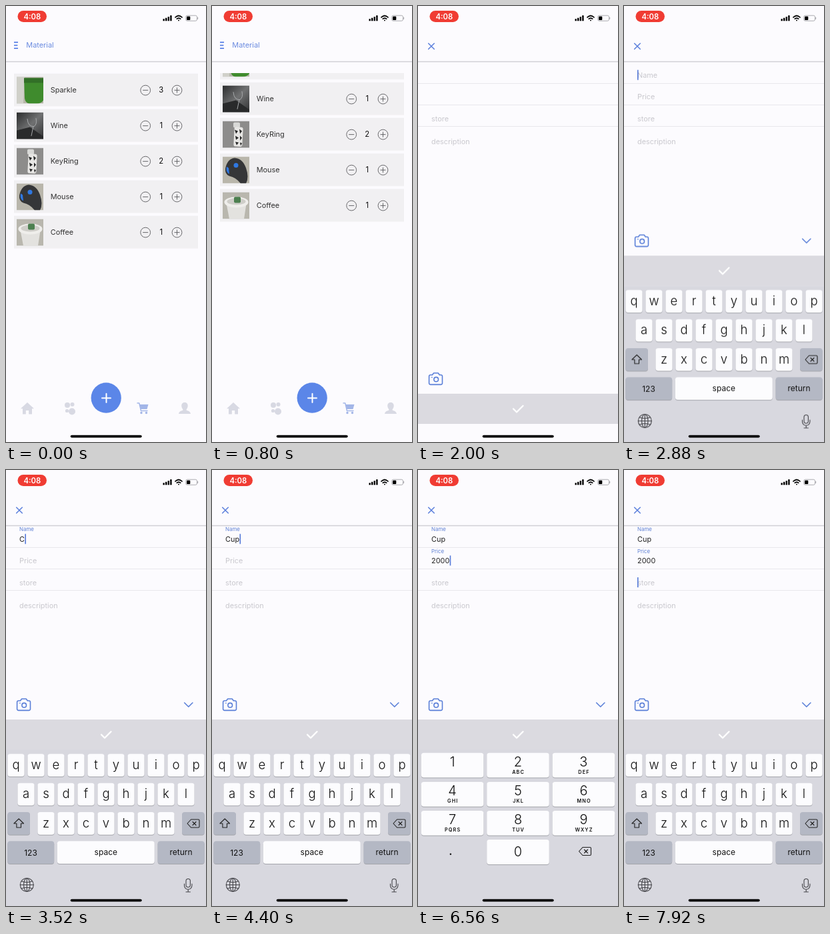
Animation, 300 px wide and 650 px high, one loop 8 s. Source, as an HTML page:

```html
<!DOCTYPE html>
<html lang="en">
<head>
<meta charset="utf-8">
<title>Material list</title>
<style>
  html, body { margin: 0; width: 100%; height: 100%; overflow: hidden; background: #fcfbfe; }
  svg { display: block; width: 100%; height: 100%; }
  text { font-family: Inter, Roboto, sans-serif; }
  .line { fill: none; stroke-linecap: round; stroke-linejoin: round; }
</style>
</head>
<body>
<svg id="stage" viewBox="0 0 300 650">
  <defs>
    <clipPath id="listClip"><rect x="0" y="100.5" width="300" height="440"/></clipPath>
    <clipPath id="thumbClip"><rect width="40" height="40"/></clipPath>
    <linearGradient id="dark" x2="1" y2="1">
      <stop stop-color="#2b2c2d"/><stop offset=".5" stop-color="#707172"/><stop offset="1" stop-color="#303132"/>
    </linearGradient>
  </defs>
  <rect width="300" height="650" fill="#fcfbfe"/>

  <g id="home">
    <path d="M12 54.2h6M12 58.7h5.4M12 63.2h6" stroke="#5b82e6" stroke-width="1.8"/>
    <rect y="82" width="300" height="2" fill="#dcdbe0"/>
    <g clip-path="url(#listClip)"><g id="list"></g></g>
    <g fill="#d8d9e3">
      <path d="M32 591l10 9.2h-3v8.300h-4.800v-5.500h-4.400v5.500h-4.800v-8.300h-3z"/>
      <circle cx="92" cy="595" r="4"/><circle cx="99.500" cy="594" r="3"/>
      <circle cx="99" cy="604.500" r="5"/><circle cx="91.500" cy="603.500" r="2.600"/>
      <path d="M268 591c3.400 0 5 2.600 4.700 5.600-.2 2-1 3.500-2 4.600v1.600c2.800 1 5.600 1.500 6.300 5.200h-18c.7-3.700 3.500-4.200 6.300-5.200v-1.600c-1-1.100-1.800-2.600-2-4.600-.3-3 1.300-5.600 4.700-5.600z"/>
    </g>
    <g fill="#a3b6e8">
      <path d="M200.500 594h13l-2 7h-9.500z"/>
      <circle cx="203" cy="606.500" r="1.700"/><circle cx="210.500" cy="606.500" r="1.700"/>
      <path class="line" style="fill:none" d="M197 592h2.800l2.700 11.500h9.500" stroke="#a3b6e8" stroke-width="1.500"/>
    </g>
    <circle cx="150.200" cy="584.200" r="22.600" fill="#5b86e8"/>
    <path class="line" d="M144 584.500h13M150.500 578v13" stroke="#fff" stroke-width="2"/>
  </g>

  <g id="form">
    <rect width="300" height="650" fill="#fcfbfe"/>
    <path class="line" d="M15.700 55.700l8.600 8.600M24.300 55.700l-8.600 8.600" stroke="#5b7fdc" stroke-width="1.500"/>
    <rect y="82" width="300" height="2" fill="#dcdbe0"/>
    <path d="M0 115.500h300M0 147.500h300M0 179.500h300" stroke="#e9e8ec"/>
    <g id="fields"></g>
    <g id="footer">
      <rect y="578" width="300" height="45" fill="#dbdae0"/>
      <path class="line" d="M143 600.500l5 5 9.500-9.500" stroke="#fff" stroke-width="2.300"/>
      <g class="line" stroke="#5a7fd8" stroke-width="1.600">
        <path d="M18.800 550h2.700l2-2.700h6.800l2 2.700h2a2.200 2.200 0 0 1 2.200 2.200v10a2.200 2.200 0 0 1-2.200 2.200h-15.500a2.200 2.200 0 0 1-2.200-2.200v-10a2.200 2.200 0 0 1 2.200-2.200z"/>
        <circle cx="27.200" cy="556.700" r="3.300"/>
        <path d="M20.700 553.500h.3"/>
        <path id="chevron" d="M267.700 553l6.100 6 6.100-6"/>
      </g>
    </g>
    <g id="keyboard">
      <rect y="417" width="300" height="233" fill="#d8d8df"/>
      <g id="letters"></g>
      <g id="digits"></g>
    </g>
  </g>

  <rect x="17.500" y="7" width="43.500" height="17" rx="8.500" fill="#f03c33"/>
  <text x="39.300" y="19.600" font-size="11.300" font-weight="600" fill="#fff" text-anchor="middle">4:08</text>
  <path d="M235.500 19.200h2.400v3h-2.400zM239 17.700h2.400v4.500h-2.400zM242.600 16h2.400v6.200h-2.400zM246.200 14h2.400v8.200h-2.400z"/>
  <g class="line" stroke="#000" stroke-width="1.700">
    <path d="M254 16.800q5-4.600 10 0M256.300 19.200q2.700-2.300 5.400 0"/><path d="M258.900 21.400h.2"/>
  </g>
  <rect x="269.700" y="14.200" width="16.800" height="8" rx="2.200" fill="none" stroke="#a3a3a8" stroke-width=".9"/>
  <rect x="271" y="15.500" width="5.300" height="5.400" rx="1"/>
  <path d="M287.700 16.700v3" stroke="#a3a3a8"/>
  <rect x="96.700" y="639.700" width="107" height="3.800" rx="1.900"/>
</svg>

<script>
const LOOP = 8000;
const $ = id => document.getElementById(id);

function add(parent, markup) {
  const g = document.createElementNS('http://www.w3.org/2000/svg', 'g');
  g.innerHTML = markup;
  parent.append(g);
  return g;
}

const text = (x, y, s, size = 10.9, fill = '#333', more = '') =>
  `<text x="${x}" y="${y}" font-size="${size}" fill="${fill}" ${more}>${s}</text>`;
const mid = (x, y, s, size, weight = 400) =>
  text(x, y, s, size, '#111', `text-anchor="middle" font-weight="${weight}"`);

// steps: [ms, value, easing to the next step]
function track(el, prop, steps) {
  el.animate(steps.map(([t, v, easing = 'linear']) => ({ offset: t / LOOP, [prop]: v, easing })),
    { duration: LOOP, iterations: Infinity });
}

// Visible only within the given [from, to] spans, with hard changes
function show(el, ...spans) {
  const steps = [[0, 0, 'step-end']];
  for (const [a, b] of spans) steps.push([a, 1, 'step-end'], [b, b === LOOP ? 1 : 0, 'step-end']);
  if (steps[steps.length - 1][0] < LOOP) steps.push([LOOP, 0]);
  track(el, 'opacity', steps);
}

const up = y => `translateY(${y}px)`;

// Item list
const items = [
  ['Sparkle', 3, `<rect width="40" height="40" fill="#b5b5a8"/><path d="M0 0h12l-2 40H0z" fill="#d0d0c9"/>
    <path d="M11 2h29v33q-3 5-10 5H19q-6-1-7-8z" fill="#3f8b2d"/><path d="M11 2h29v7H11z" fill="#326f27"/>`],
  ['Wine', 1, `<rect width="40" height="40" fill="url(#dark)"/><path d="M0 27l20-5 20 14v4H0z" fill="#292a2b"/>
    <path class="line" d="M16 10q1 12 10 11 5-3 3-12M25 21l-3 14" stroke="#a7a9ab"/>`],
  ['KeyRing', 2, `<rect width="40" height="40" fill="#8d8c8b"/><rect x="16" y="2" width="10" height="8" rx="2" fill="#d8d8d6"/>
    <rect x="17" y="9" width="13" height="29" rx="3" fill="#e7e6e4" transform="rotate(3 23 23)"/>
    <path d="M18 13l5 2-3 4zM25 12l4 3-3 4zM19 22l5 3-4 3zM26 22l3 3-3 4zM19 31l5 1-3 4zM26 32l3 1-2 4z" fill="#252525"/>`],
  ['Mouse', 1, `<rect width="40" height="40" fill="#b9b6ab"/><path d="M4 18Q7 3 18 2q12 1 17 15 5 14 0 23H27Q20 31 10 29 3 26 4 18z" fill="#353638"/>
    <path d="M6 15q-2 8 4 11l-1-9z" fill="#2f78e2"/><circle cx="20" cy="13" r="3.500" fill="#2f78e2"/>`],
  ['Coffee', 1, `<rect width="40" height="40" fill="#b9b7ae"/><path d="M5 14h31l-4 26H10z" fill="#e3e2df"/>
    <ellipse cx="20.500" cy="15" rx="18" ry="8" fill="#efeeeb"/><ellipse cx="20.500" cy="14" rx="14" ry="5" fill="#cfcec9"/>
    <rect x="17" y="7" width="10" height="9" rx="2" fill="#4d8050"/>`]
];
add($('home'), text(30.3, 62.4, 'Material', 10.9, '#6b8ce0'));
items.forEach(([name, count, photo], i) => {
  const row = add($('list'), `<rect x="12" y=".8" width="276" height="48.700" fill="#f1f0f2"/>
    <g transform="translate(16 5.500)" clip-path="url(#thumbClip)">${photo}</g>
    ${text(66.7, 29.2, name)}${mid(232.8, 28.8, count, 11.3)}
    <g fill="none" stroke="#5b5b5e" stroke-width=".9"><circle cx="209.200" cy="25.600" r="7.400"/><circle cx="256.500" cy="25.600" r="7.400"/>
    <path d="M205.200 25.600h8M252.500 25.600h8M256.500 21.600v8"/></g>`);
  row.setAttribute('transform', `translate(0 ${100 + i * 53})`);
});
track($('list'), 'transform', [
  [0, up(0)], [120, up(0), 'ease-in-out'], [720, up(-40)], [880, up(-40), 'cubic-bezier(.2,.6,.3,1)'],
  [1360, up(0)], [LOOP, up(0)]
]);

// Screen and keyboard moves
const OPEN = 1780, KEYS = 2620;
track($('form'), 'transform', [
  [0, up(650)], [OPEN, up(650), 'cubic-bezier(.2,.7,.3,1)'], [1990, up(0)], [LOOP, up(0)]
]);
const rise = (el, dist, from, to) => track(el, 'transform', [
  [0, up(from)], [KEYS, up(from), 'cubic-bezier(.2,.7,.2,1)'], [KEYS + 280, up(to)], [LOOP, up(to)]
]);
rise($('footer'), 206, 0, -206);
rise($('keyboard'), 233, 233, 0);
show($('chevron'), [KEYS, LOOP]);

// Form fields: placeholder, floating label, typed states
const PRICE = 4880, STORE = 7300;
const grey = '#c9c8ce', blue = '#5f80d4';

function field(name, y, typedAt) {
  const hint = add($('fields'), text(20, y, name, 10.9, grey));
  if (!typedAt) return;
  show(hint, [0, typedAt]);
  const label = add($('fields'), text(20, y - 15.6, name, 7.9, blue));
  track(label, 'opacity', [[0, 0], [typedAt, 0], [typedAt + 80, 1], [LOOP, 1]]);
}

// states: [ms, value]; the caret stays until blur, the last value stays on
function typing(y, states, blur) {
  states.forEach(([from, value], i) => {
    const next = states[i + 1];
    const g = add($('fields'), text(20, y, value, 10.9, '#222'));
    show(g, [from, next ? next[0] : LOOP]);
    const x = 20 + (value ? g.firstChild.getComputedTextLength() + .4 : 0);
    const caret = add($('fields'), `<rect x="${x}" y="${y - 11.7}" width="1.600" height="15" fill="#5579d8"/>`);
    const end = next ? next[0] : blur, spans = [];
    for (let t = from; t < end; t += 1000) spans.push([t, Math.min(t + 650, end)]);
    show(caret, ...spans);
  });
}

field('Name', 107, 3440);
field('Price', 139.2, 5480);
field('store', 171.7);
field('description', 206);
typing(107, [[2680, ''], [3440, 'C'], [3920, 'Cu'], [4320, 'Cup']], PRICE);
const zeros = [5760, 6000, 6240];
typing(139.2, [[PRICE, ''], [5480, '2'], ...zeros.map((t, i) => [t, '2' + '0'.repeat(i + 1)])], STORE);
typing(171.7, [[STORE, '']], LOOP);

// Keys
const key = (x, y, w, h, fill = '#fcfcfe') =>
  `<rect x="${x}" y="${y + 1}" width="${w}" height="${h}" rx="4" fill="#a4a5ab"/>
   <rect x="${x}" y="${y}" width="${w}" height="${h}" rx="4" fill="${fill}"/>`;
const erase = (x, y) => `<path class="line" stroke="#222" stroke-width="1.100"
  d="M${x - 9} ${y}l5.500-6h11a1.500 1.500 0 0 1 1.500 1.500v9a1.500 1.500 0 0 1-1.500 1.500h-11zM${x - 1} ${y - 2.5}l5 5m0-5l-5 5"/>`;
const arrow = fill => `<path class="line" style="fill:${fill}" stroke="#222" stroke-width="1.100"
  d="M19.200 520l7.300 7h-4v6h-6.600v-6h-4z"/>`;

const letters = $('letters'), dim = '#b4b8c4';
const rows = [['qwertyuiop', 15], ['asdfghjkl', 30], ['zxcvbnm', 60]];
const eachKey = draw => rows.map(([row, x], r) =>
  [...row].map((c, i) => draw(c, x + i * 30, 423.3 + r * 43.4)).join('')).join('');

add(letters, eachKey((c, x, y) => key(x - 12.6, y, 25.2, 33.6))
  + key(2.4, 510.1, 33.6, 33.6, dim) + key(264, 510.1, 33.6, 33.6, dim) + erase(281, 527)
  + key(2.4, 553.3, 69.8, 33.6, dim) + key(76.8, 553.3, 146, 33.6) + key(227.6, 553.3, 70, 33.6, dim)
  + mid(37, 574.5, '123', 12) + mid(149.8, 574, 'space', 12) + mid(262.6, 574, 'return', 12)
  + `<g class="line" stroke="#45454a" stroke-width="1.100"><circle cx="31.300" cy="618.500" r="10"/>
     <ellipse cx="31.300" cy="618.500" rx="4.700" ry="10"/><path d="M21.300 618.500h20M31.300 608.500v20M23.300 613q8 3.500 16 0M23.300 624q8-3.500 16 0"/>
     <rect x="270" y="609.500" width="6.400" height="12.500" rx="3.200"/><path d="M267.500 617v2.500a5.700 5.700 0 0 0 11.400 0V617M273.200 625.500v3.500M270 629h6.400"/></g>`);
const SHIFT = [3040, 3440];
const lower = add(letters, eachKey((c, x, y) => mid(x, y + 22.7, c, 18.6, 300)) + arrow('none'));
const upper = add(letters, key(2.4, 510.1, 33.6, 33.6) + arrow('#222')
  + eachKey((c, x, y) => mid(x, y + 23.4, c.toUpperCase(), 18, 300)));
show(lower, [0, SHIFT[0]], [SHIFT[1], LOOP]);
show(upper, SHIFT);
show(letters, [0, PRICE], [STORE, LOOP]);

const pad = $('digits');
const presses = { 2: [[5360, 5480]], 0: zeros.map(t => [t - 100, t]) };
add(pad, '<rect y="417" width="300" height="233" fill="#d8d8df"/>');
['', 'ABC', 'DEF', 'GHI', 'JKL', 'MNO', 'PQRS', 'TUV', 'WXYZ', '0'].forEach((sub, i) => {
  const zero = i === 9, n = zero ? 0 : i + 1;
  const x = 4.8 + (zero ? 1 : i % 3) * 98.4, y = 421.8 + Math.floor(i / 3) * 43.1;
  add(pad, key(x, y, 93.6, 36.8));
  if (presses[n]) show(add(pad, key(x, y, 93.6, 36.8, '#b2c0df')), ...presses[n]);
  add(pad, mid(x + 46.8, y + (zero ? 25 : 19.8), n, 20, 300)
    + (zero ? '' : text(x + 47.4, y + 31.3, sub, 7.3, '#111',
      'text-anchor="middle" font-weight="600" letter-spacing="1.1"')));
});
add(pad, mid(48.8, 574, '.', 20) + erase(250.5, 568.5));
show(pad, [PRICE, STORE]);
</script>
</body>
</html>
```
